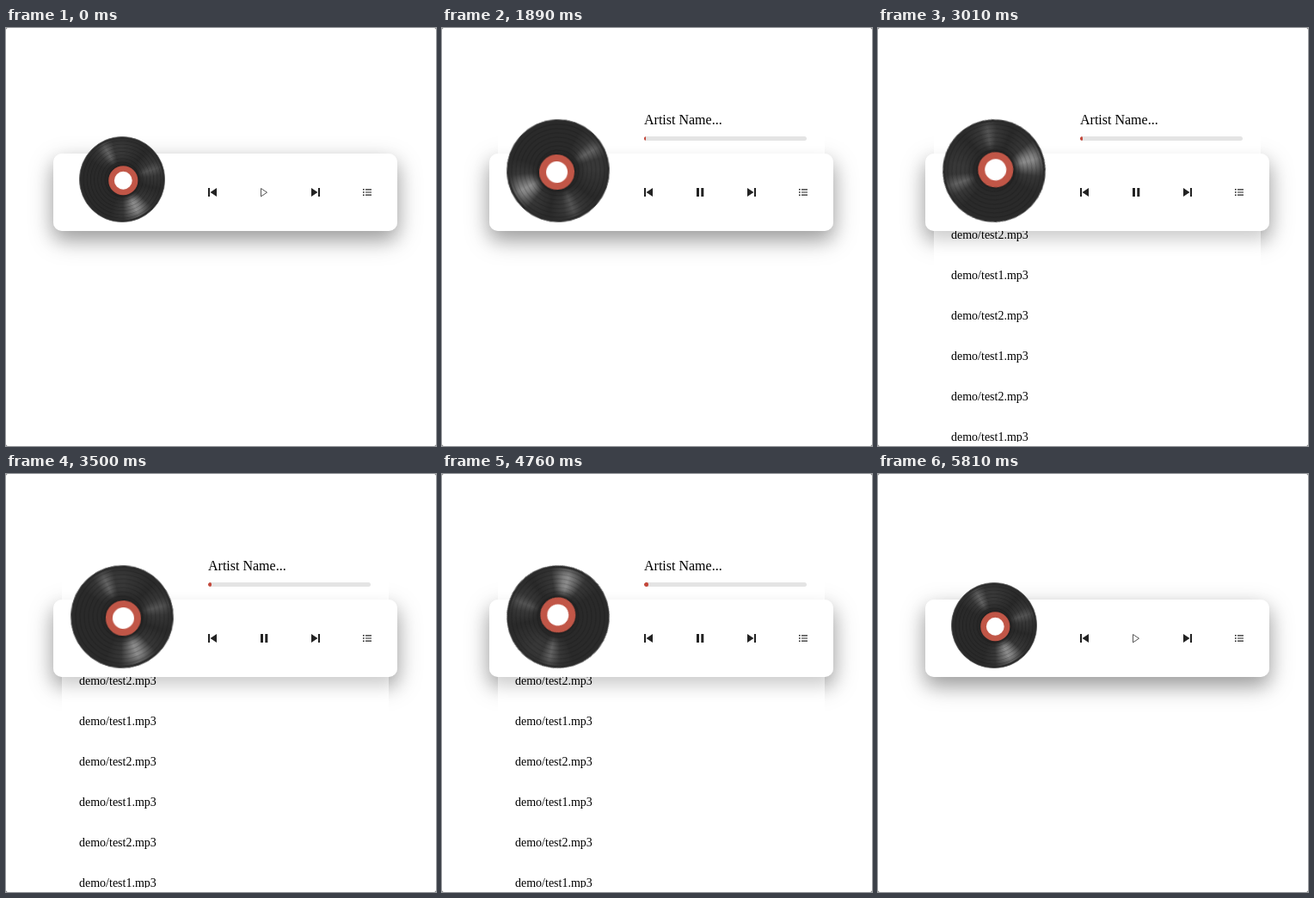
These frames come from a looping animation (500x486 px, 6.3 s). An HTML page:

```html
<!DOCTYPE html>
<html lang="en">
<head>
<meta charset="utf-8">
<title>Music player</title>
<style>
  html, body { margin: 0; width: 100%; height: 100%; overflow: hidden; background: #555; }
  body { font-family: "Liberation Serif", "Times New Roman", serif; color: #000; }
  div, svg { position: absolute; box-sizing: border-box; }
  #stage { left: 0; top: 0; width: 500px; height: 486px; overflow: hidden; background: #fff; border-radius: 2px; }
  .card { left: 55px; top: 146px; width: 400px; height: 90px; border-radius: 10px; background: #fff; }
  #glow { box-shadow: 0 10px 30px rgba(0, 0, 0, .25); }
  #player { box-shadow: 0 10px 20px rgba(0, 0, 0, .2); }

  #info { left: 65px; top: 86px; width: 380px; height: 60px; background: #fff; }
  #artist { left: 170px; top: 12px; font-size: 16px; line-height: 18px; white-space: nowrap; }
  #track { left: 170px; top: 39.5px; width: 189px; height: 5px; border-radius: 2.5px; background: #e4e4e4; overflow: hidden; }
  #bar { left: 0; top: 0; height: 5px; background: #c4473a; border-radius: 2px; }

  #list { left: 65px; top: 170px; width: 380px; background: #fff; overflow: hidden; }
  #list div { left: 20px; height: 47px; font-size: 14px; line-height: 47px; white-space: nowrap; }

  #disc { left: 75px; top: 106px; width: 120px; height: 120px; transform-origin: 50% 100%; }
  #vinyl, #shine, #grooves, #label { border-radius: 50%; }
  #vinyl, #shine, #grooves { inset: 0; }
  #vinyl { background: #2a2a2a; border: 1px solid #5c5c5c; }
  #shine {
    inset: 2px;
    background: conic-gradient(
      #fff1 0deg, #fff0 40deg, #fff1 60deg, #fff3 72deg, #fff1 84deg, #fff0 105deg,
      #fff1 132deg, #fff6 148deg, #fff7 155deg, #fff5 163deg, #fff1 178deg, #fff0 200deg,
      #fff0 300deg, #fff1 318deg, #fff4 332deg, #fff1 346deg, #fff1 360deg);
    mask-image: radial-gradient(circle, #0000 22px, #000 34px, #000 48px, #0006 58px);
  }
  #grooves { background: repeating-radial-gradient(circle, #0000 0 3px, #0003 4px, #0000 5px); }
  #label { left: 39.5px; top: 39.5px; width: 41px; height: 41px; background: #fff; border: 8.3px solid #c15647; box-shadow: 0 0 5px 1px #1c1c1c; }
  #icons { left: 0; top: 0; }
</style>
</head>
<body>
<div id="stage">
  <div id="glow" class="card"></div>
  <div id="info">
    <div id="artist">Artist Name...</div>
    <div id="track"><div id="bar"></div></div>
  </div>
  <div id="list"></div>
  <div id="player" class="card"></div>
  <svg id="icons" width="500" height="486" fill="#222">
    <path d="M235 186h2v10h-2zM245 186v10l-7.5-5z"/>
    <path id="play" d="M296.5 186.5v9.4l7-4.7z" fill="none" stroke="#444" stroke-width=".9"/>
    <path id="pause" d="M296 186h3v10h-3zM301.3 186h3v10h-3z"/>
    <path d="M363 186h2v10h-2zM355 186v10l7.5-5z"/>
    <path d="M415 187h1.6v1.5h-1.6zm0 3.2h1.6v1.5h-1.6zm0 3.2h1.6v1.5h-1.6zM418 187.2h7v1.2h-7zm0 3.2h7v1.2h-7zm0 3.2h7v1.2h-7z"/>
  </svg>
  <div id="disc">
    <div id="vinyl"><div id="shine"></div><div id="grooves"></div><div id="label"></div></div>
  </div>
</div>
<script>
  const LOOP = 6300, FADE = 315, SPIN = 2100;
  const START = 1382, STOP = 5490;
  const LIST_OPEN = 2570, LIST_CLOSE = 4980;
  const el = id => document.getElementById(id);

  // steps: [time in ms, value, easing towards the next step]
  function loop(target, property, steps) {
    const frames = steps.map(([time, value, easing = "linear"]) =>
      ({ offset: time / LOOP, [property]: value, easing }));
    target.animate(frames, { duration: LOOP, iterations: Infinity });
  }

  // Eases from one value to the other at `open`, and back at `close`.
  function toggle(target, property, off, on, open, close, duration = FADE) {
    loop(target, property, [
      [0, off], [open, off, "ease"], [open + duration, on],
      [close, on, "ease"], [close + duration, off], [LOOP, off]
    ]);
  }

  const rows = Array.from({ length: 7 }, (_, i) => {
    const row = document.createElement("div");
    row.textContent = `demo/test${i % 2 + 1}.mp3`;
    row.style.top = `${i * 47}px`;
    el("list").append(row);
    return row;
  });

  toggle(el("disc"), "transform", "scale(.8333)", "scale(1)", START, STOP);
  toggle(el("info"), "transform", "translateY(60px)", "translateY(0px)", START, STOP);
  toggle(el("list"), "height", "0px", "311px", LIST_OPEN, LIST_CLOSE);
  toggle(el("pause"), "opacity", 0, 1, START, STOP, 0);
  toggle(el("play"), "opacity", 1, 0, START, STOP, 0);

  const turn = (STOP - START) / SPIN * 360;
  loop(el("vinyl"), "transform", [
    [0, "rotate(0deg)"], [START, "rotate(0deg)"], [STOP, `rotate(${turn}deg)`],
    [STOP, "rotate(0deg)"], [LOOP, "rotate(0deg)"]
  ]);
  loop(el("bar"), "width", [
    [0, "2px"], [START, "2px"], [STOP, "5.7px"], [LOOP, "5.7px"]
  ]);
  loop(rows[2], "color", [
    [0, "#000"], [3990, "#000"], [4060, "#3a3a3a"], [4130, "#000"], [LOOP, "#000"]
  ]);
</script>
</body>
</html>
```
